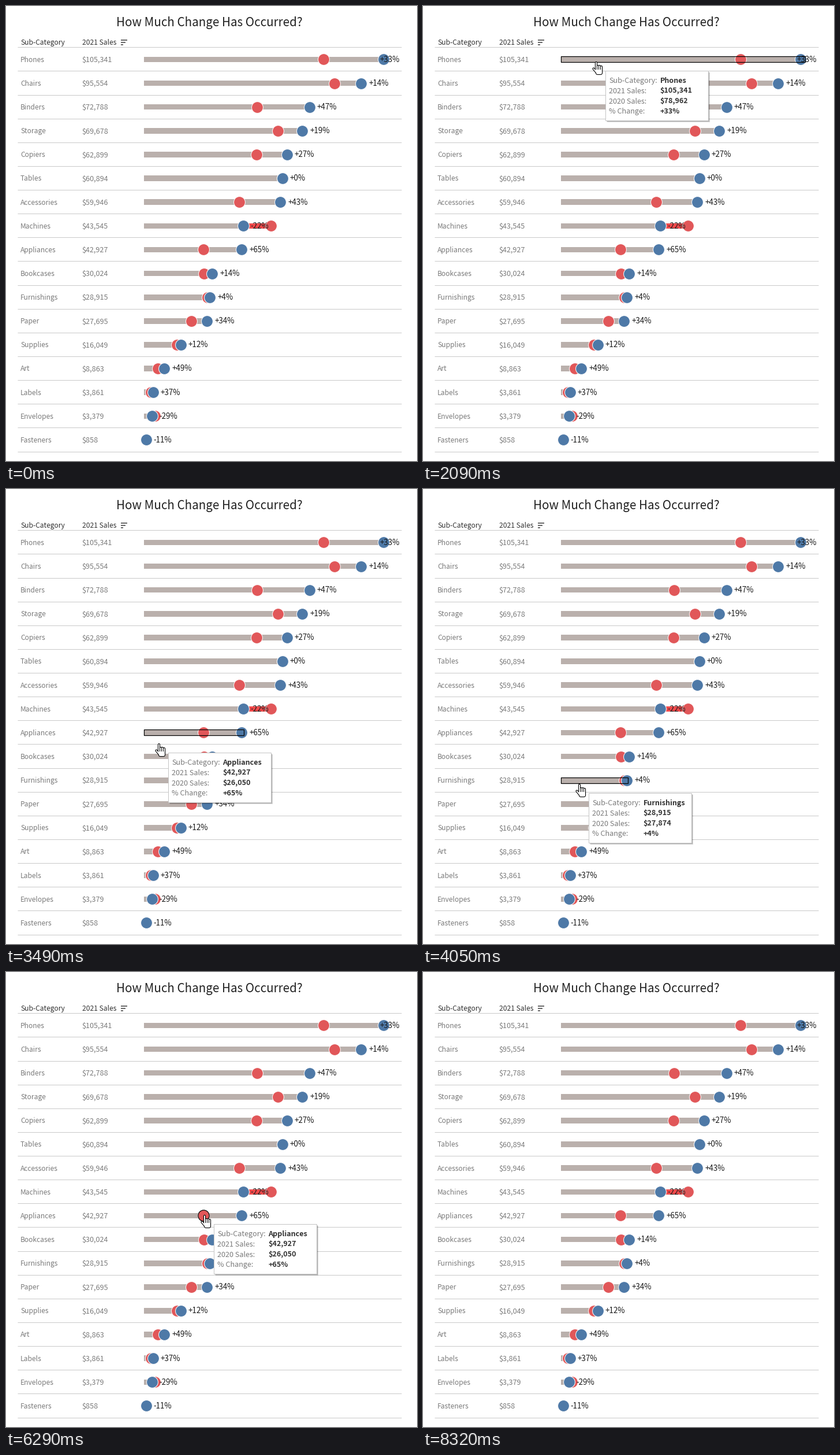
These frames come from a looping animation (712x787 px, 8.6 s). A matplotlib script:

```python
import numpy as np
import matplotlib.pyplot as plt
from matplotlib.animation import FuncAnimation
from matplotlib.patches import Rectangle
from matplotlib.transforms import Affine2D

W, H, DPI = 712, 787, 64
PX = 72 / DPI  # points per pixel
LOOP, STEP = 8600, 40

plt.rcParams.update({"font.family": ["Noto Sans CJK JP", "DejaVu Sans"],
                     "text.parse_math": False})

NAMES = ("Phones Chairs Binders Storage Copiers Tables Accessories Machines "
         "Appliances Bookcases Furnishings Paper Supplies Art Labels "
         "Envelopes Fasteners").split()
SALES = np.array([105341, 95554, 72788, 69678, 62899, 60894, 59946, 43545,
                  42927, 30024, 28915, 27695, 16049, 8863, 3861, 3379, 858])
PRIOR = np.array([78962, 83919, 49683, 58789, 49599, 60833, 41896, 55907,
                  26050, 26275, 27874, 20662, 14278, 5961, 2827, 4730, 961])
CHANGE = [f"{100 * (a / b - 1):+.0f}%" for a, b in zip(SALES, PRIOR)]

BLUE, RED, TAUPE, BRIGHT = "#4e79a7", "#e15759", "#bab0ac", "#f04a4b"
GREY, DARK, RULE = "#7b7b7b", "#333333", "#c9c9c9"

TOP, PITCH, X0 = 71.3, 41.13, 239
ROW_Y = TOP + 21.1 + PITCH * np.arange(len(NAMES))


def dot_x(v):
    return X0 + 0.4 + v * 0.003932


def bar_x(v):
    return X0 + v * 0.00402  # the bars run on a slightly longer axis


fig = plt.figure(figsize=(W / DPI, H / DPI), dpi=DPI, facecolor="white")
ax = fig.add_axes([0, 0, 1, 1])


def text(x, y, s, size, color, **kw):
    return ax.text(x, y, s, fontsize=size * PX, color=color, **kw)


def bars(y, start, end, color):
    ax.barh(y, end - start, height=9.6, left=start, color=color, zorder=1)


def dots(v, color, z):
    ax.scatter(dot_x(v), ROW_Y, s=(19.8 * PX) ** 2, color=color,
               edgecolor="white", linewidth=1 * PX, zorder=z)


# Static chart
text(352.5, 34.5, "How Much Change Has Occurred?", 20.55, "#222222",
     ha="center")
text(25, 67, "Sub-Category", 12, DARK)
text(131.5, 67, "2021 Sales", 12, DARK)
for k in range(3):
    y = 58.5 + 4 * k
    ax.plot([199, 210 - 3.5 * k], [y, y], color="#444444", lw=1.6 * PX,
            solid_capstyle="butt")
for k in range(len(NAMES) + 1):
    y = TOP + PITCH * k
    ax.plot([20, 685], [y, y], color=RULE, lw=1 * PX, zorder=0,
            solid_capstyle="butt", snap=True)
down = PRIOR > SALES
bars(ROW_Y, X0, bar_x(SALES), TAUPE)
bars(ROW_Y[down], bar_x(SALES[down]), bar_x(PRIOR[down]), BRIGHT)
dots(PRIOR, RED, 2)
dots(SALES, BLUE, 3)
for name, sale, change, y in zip(NAMES, SALES, CHANGE, ROW_Y + 4.4):
    text(25, y, name, 12, GREY)
    text(131.5, y, f"${sale:,}", 12.6, GREY)
    text(min(dot_x(sale) + 13, 647.5), y, change, 13.3, "#1c1c1c", zorder=4)

# Mark highlights
outline = ax.add_patch(Rectangle((0, 0), 1, 10, fill=False, ec="black",
                                 lw=1.2 * PX, zorder=5))
ring, = ax.plot([0], [0], "o", ms=19.2 * PX, mfc="none", mec="black",
                mew=1.2 * PX, zorder=5)

# Tooltip and hand, both placed relative to the pointer tip
shift = Affine2D()
place = shift + ax.transData
TIP_X, TIP_Y, TIP_W, TIP_H = 15.5, 16.5, 178, 86
tooltip, values, hand = [], [], []


def panel(offset, z, **style):
    patch = Rectangle((TIP_X + offset, TIP_Y + offset), TIP_W, TIP_H,
                      zorder=z, **style)
    patch.set_transform(place)
    tooltip.append(ax.add_patch(patch))


for d in (3, 2, 1):
    panel(d, 6, fc="black", ec="none", alpha=0.16)
panel(0, 7, fc="white", ec="#c4c4c4", lw=1 * PX)
for k, label in enumerate(("Sub-Category:", "2021 Sales:", "2020 Sales:",
                           "% Change:")):
    y = TIP_Y + 21.5 + 17.8 * k
    tooltip.append(text(TIP_X + 6.5, y, label, 12.6, GREY, zorder=8,
                        transform=place))
    values.append(text(TIP_X + 95, y, "", 12.6, DARK, weight="bold",
                       zorder=8, transform=place))
tooltip += values


def stroke(x, y, width, color, z):
    hand.extend(ax.plot(x, y, color=color, lw=width * PX, zorder=z,
                        solid_capstyle="round", solid_joinstyle="round",
                        transform=place))


def limb(x, y, width):
    stroke(x, y, width + 2.2, "black", 9)
    stroke(x, y, width, "white", 10)


for k in range(4):
    limb([3 * k] * 2, [3 if k == 0 else 8 + 0.7 * k, 17], 2)
limb([-4.5, 0], [13.5, 19], 2)
limb([1.5, 7.5, 7.5, 1.5, 1.5], [17, 17, 21, 21, 17], 4)

ax.set(xlim=(0, W), ylim=(H, 0))
ax.axis("off")

# Pointer moves: start, end, x, y; it rests in between
START = (478, 560)
MOVES = [
    (600, 800, 460, 375), (800, 1160, 300, 95),
    (2260, 2470, 300, 123),
    (2990, 3490, 265, 439), (3530, 3820, 271, 509),
    (4810, 5030, 344, 454), (5070, 5600, 344, 419),
    (6330, 6770, 414, 390),
    (7320, 7470, 392, 371),
    (7580, 8310, 696, 761),
]


def pointer(t):
    pos = np.array(START, float)
    for t0, t1, *goal in MOVES:
        pos += np.clip((t - t0) / (t1 - t0), 0, 1) * (goal - pos)
    return pos


def hit(x, y):
    """Row, mark kind and mark extent under the pointer."""
    row = int((y - TOP) // PITCH)
    now, before = SALES[row], PRIOR[row]
    for cx in (dot_x(now), dot_x(before)):
        if np.hypot(x - cx, y - ROW_Y[row]) < 10:
            return row, "dot", (cx, cx)
    if down[row] and bar_x(now) - 1 <= x <= bar_x(before) + 3:
        return row, "bar", (bar_x(now), bar_x(before))
    if X0 <= x <= bar_x(now) + 3:
        return row, "bar", (X0 - 0.5, bar_x(now))
    return row, None, None


def show(artists, on):
    for artist in artists:
        artist.set_visible(on)


def update(i):
    t = i * STEP + 30
    active = 630 <= t < 8320
    x, y = pointer(t)
    row, kind, span = hit(x, y)
    if not active:
        kind = None
    shift.clear().translate(round(x), round(y))
    show(hand, active)
    show(tooltip, kind is not None)
    outline.set_visible(kind == "bar")
    ring.set_visible(kind == "dot")
    if kind == "bar":
        outline.set_xy((span[0], ROW_Y[row] - 5))
        outline.set_width(span[1] - span[0])
    elif kind == "dot":
        ring.set_data([span[0]], [ROW_Y[row]])
    if kind:
        for item, s in zip(values, (NAMES[row], f"${SALES[row]:,}",
                                    f"${PRIOR[row]:,}", CHANGE[row])):
            item.set_text(s)
    return []


anim = FuncAnimation(fig, update, frames=LOOP // STEP, interval=STEP,
                     repeat=True, repeat_delay=0, blit=False)
plt.show()
```
